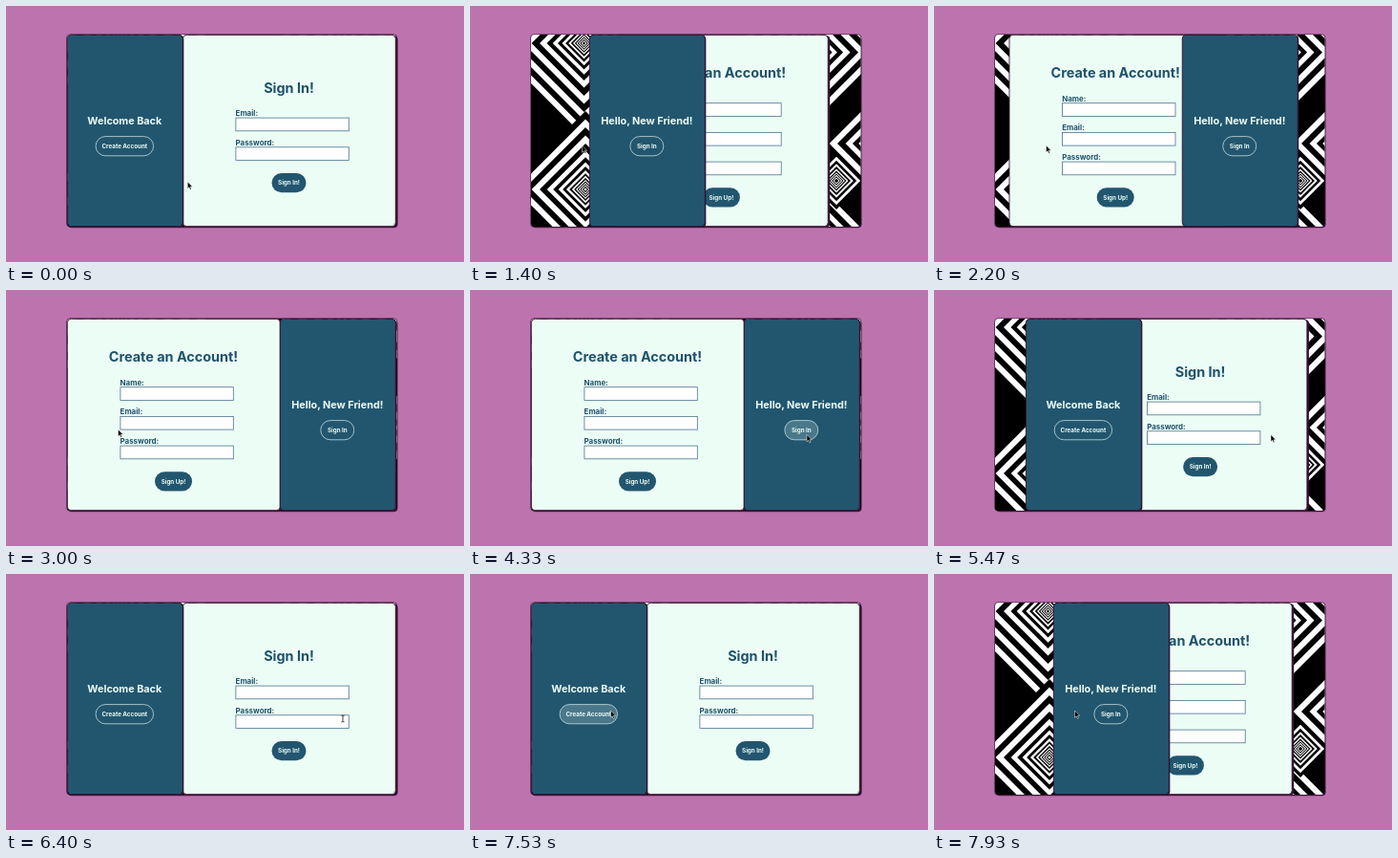
Animation of 480 by 268 pixels, one loop 8000 ms. Source, as an HTML page:

```html
<!DOCTYPE html>
<html lang="en">
<head>
<meta charset="utf-8">
<title>Sliding sign-in card</title>
<style>
  html, body { margin: 0; width: 100%; height: 100%; overflow: hidden; background: #bc73ae; }
  svg { display: block; }
  text { font: 700 10.8px Inter, sans-serif; fill: #1e526d; }
  .mid { text-anchor: middle; }
  .title { font-size: 14.4px; }
  .label { font-size: 7.9px; }
  .light { fill: #ecfdf5; }
  .btn { font-size: 6.25px; fill: #ecfdf5; }
  .panel { stroke: #35102f; stroke-width: .9; }
  .shadow { fill: #35102f; }
  .field { fill: #fff; stroke: #4a7390; stroke-width: .8; }
  .ghost { fill: #ecfdf5; fill-opacity: 0; stroke: #c3dcdc; stroke-width: .8; }
  .ghost.hover { fill-opacity: .2; }
  .solid { fill: #22566f; }
</style>
</head>
<body>
<svg width="480" height="268" viewBox="0 0 480 268">
  <defs>
    <clipPath id="card"><rect x="64" y="30" width="345.5" height="201" rx="4"/></clipPath>
    <filter id="soft"><feGaussianBlur stdDeviation=".6"/></filter>
  </defs>
  <rect x="65" y="31.3" width="345.5" height="201" rx="4" fill="#4a1542" filter="url(#soft)"/>
  <rect x="63.4" y="29.4" width="346.6" height="202" rx="4" fill="#35102f"/>
  <g id="pattern" clip-path="url(#card)"></g>
  <g id="form">
    <rect class="shadow" x="2" y="31" width="223.3" height="200.4" rx="4"/>
    <rect class="panel" x=".3" y="30.3" width="223" height="200.4" rx="4" fill="#ecfdf5"/>
    <g id="signIn"></g>
    <g id="signUp"></g>
  </g>
  <g id="side">
    <rect class="shadow" x="1" y="31" width="121.3" height="200.4" rx="4"/>
    <rect class="panel" x=".3" y="30.3" width="121" height="200.4" rx="4" fill="#22566f"/>
    <g id="welcome"></g>
    <g id="hello"></g>
  </g>
  <g id="cursor">
    <path id="arrow" d="M0 0V7.3L1.7 5.8 2.8 8.3 4 7.8 2.9 5.3H5.2Z" fill="#000" stroke="#fff" stroke-width=".5"/>
    <path id="beam" d="M-1.6-3.4Q0-3.4 0-2.6V2.6Q0 3.4-1.6 3.4M1.6-3.4Q0-3.4 0-2.6M0 2.6Q0 3.4 1.6 3.4" fill="none" stroke="#111" stroke-width=".8"/>
  </g>
</svg>
<script>
const LOOP = 8000, SLIDE = 2000, LEFT = 64, SIDE_W = 121, FORM_W = 223;
const $ = id => document.getElementById(id);
const move = (el, x, y) => el.setAttribute('transform', `translate(${x} ${y})`);
const show = (el, on) => el.style.display = on ? '' : 'none';

// Black and white diamond tunnel: even bands outside, ever finer ones inside
function tunnel(cx, cy, radius) {
  let out = '', white = false;
  for (let r = radius; r > 1; r -= Math.min(8.5, Math.max(1.3, r * .16))) {
    out += `<path d="M${cx - r} ${cy}l${r} ${-r} ${r} ${r} ${-r} ${r}z" fill="${white ? '#fff' : '#000'}"/>`;
    white = !white;
  }
  return out;
}
$('pattern').innerHTML = '<path d="M60 26h354v210H60z"/>' +
  tunnel(119.5, 39, 106) + tunnel(121, 192, 82) +
  tunnel(352, 238, 72) + tunnel(440, 144, 72) +
  tunnel(352, 48.5, 89) + tunnel(384, 183, 30);

const text = (cls, x, y, str) => `<text class="${cls}" x="${x}" y="${y}">${str}</text>`;
const pill = (cls, cx, y, w, str) =>
  `<rect class="${cls}" x="${cx - w / 2}" y="${y}" width="${w}" height="20.2" rx="10.1"/>` +
  text('btn mid', cx, y + 12.4, str);
const form = (title, titleY, labels, fieldY, button, w) =>
  text('title mid', 111.5, titleY, title) +
  labels.map((label, i) => {
    const y = fieldY + i * 30.7;
    return text('label', 55.6, y - 2, label) +
      `<rect class="field" x="55.9" y="${y}" width="118.4" height="13.7"/>`;
  }).join('') +
  pill('solid', 111.5, fieldY + labels.length * 30.7 - 3.5, w, button);

$('signIn').innerHTML = form('Sign In!', 90.5, ['Email:', 'Password:'], 117.1, 'Sign In!', 36);
$('signUp').innerHTML = form('Create an Account!', 75, ['Name:', 'Email:', 'Password:'], 101.7, 'Sign Up!', 39);
$('welcome').innerHTML = text('mid light', 60.3, 124.2, 'Welcome Back') + pill('ghost', 60.3, 136.6, 60.5, 'Create Account');
$('hello').innerHTML = text('mid light', 60.3, 124.2, 'Hello, New Friend!') + pill('ghost', 60.3, 136.6, 35, 'Sign In');

// The CSS "ease" curve
function ease(x) {
  if (x <= 0) return 0;
  if (x >= 1) return 1;
  const bez = (s, a, b) => 3 * (1 - s) ** 2 * s * a + 3 * (1 - s) * s * s * b + s ** 3;
  let lo = 0, hi = 1;
  for (let i = 0; i < 24; i++) {
    const s = (lo + hi) / 2;
    if (bez(s, .25, .25) < x) lo = s; else hi = s;
  }
  return bez(lo, .1, 1);
}

const clicks = [1020, 4350, 7550];
const path = [
  { from: 70, to: 670, x: 117.5, y: 146 },
  { from: 3060, to: 3530, x: 353, y: 151.5 },
  { from: 6870, to: 7500, x: 147.5, y: 143 }
];

function cursorAt(t) {
  let x = 190.3, y = 184;
  for (const leg of path) {
    const k = Math.min(1, Math.max(0, (t - leg.from) / (leg.to - leg.from)));
    const e = k * k * (3 - 2 * k);
    x += (leg.x - x) * e;
    y += (leg.y - y) * e;
  }
  return { x, y };
}

function draw(t) {
  const count = clicks.filter(c => t >= c).length;
  const signingUp = count % 2 === 1;
  const e = count ? ease((t - clicks[count - 1]) / SLIDE) : 1;
  const p = signingUp ? e : 1 - e;
  const sideX = LEFT + FORM_W * p;
  move($('side'), sideX, 0);
  move($('form'), LEFT + SIDE_W * (1 - p), 0);
  show($('signIn'), !signingUp);
  show($('welcome'), !signingUp);
  show($('signUp'), signingUp);
  show($('hello'), signingUp);

  const { x, y } = cursorAt(t);
  const beam = t >= 6370 && t < 7500 && x > 240 && x < 359 && y > 147.5;
  move($('cursor'), x, y);
  show($('beam'), beam);
  show($('arrow'), !beam);

  const half = signingUp ? 17.5 : 30;
  const hover = Math.abs(x - sideX - 60.3) < half && y > 136.6 && y < 156.8;
  for (const ghost of document.querySelectorAll('.ghost')) ghost.classList.toggle('hover', hover);
}

const start = performance.now();
function tick() {
  draw((performance.now() - start) % LOOP);
  requestAnimationFrame(tick);
}
tick();
</script>
</body>
</html>
```
